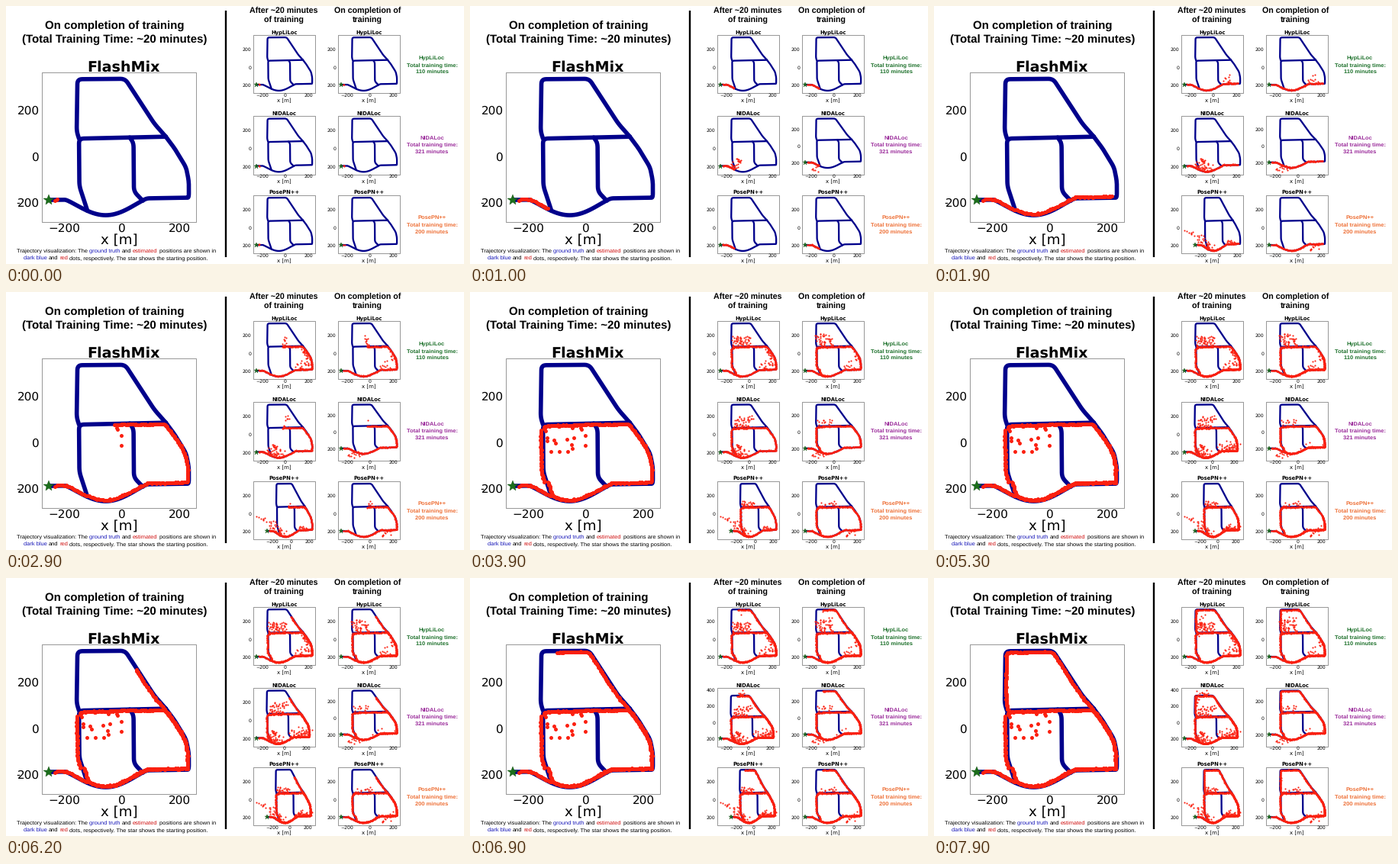
A matplotlib script that plays this animation: 600 px wide and 338 px high, repeating every 8000 ms.

```python
import numpy as np
import matplotlib.pyplot as plt
from matplotlib.animation import FuncAnimation
from matplotlib.patches import Rectangle

W, H, DPI = 600, 338, 100
PT = 72 / DPI  # points per pixel
BLUE, RED, GREEN = "#00008b", "#fb2010", "#1b6e1b"
SANS, DEJAVU = "Liberation Sans", "DejaVu Sans"

plt.rcParams["text.hinting"] = "none"
fig = plt.figure(figsize=(W / DPI, H / DPI), dpi=DPI, facecolor="white")
ax = fig.add_axes([0, 0, 1, 1])
ax.set(xlim=(0, W), ylim=(H, 0))
ax.axis("off")
rng = np.random.default_rng(4)


def bend(points, r=6):
    """Polyline with its corners rounded."""
    p = np.array(points, float)
    out, t = [p[:1]], np.linspace(0, 1, 6)[:, None]
    for a, b, c in zip(p, p[1:], p[2:]):
        u, v = a - b, c - b
        u *= min(.5, r / np.hypot(*u))
        v *= min(.5, r / np.hypot(*v))
        out.append(b + u * (1 - t) ** 2 + v * t ** 2)
    return np.vstack(out + [p[-1:]])


# Road map, y pointing down; one metre is .375 across and .3 down
x = np.linspace(57, 239, 60)
dip = np.sin(np.pi * np.clip((x - 78) / 107, 0, 1))
BOTTOM = np.c_[x, 254 - 3 * (x - 57) / 182 + 21 * dip ** 1.2]
RIGHT = [(239, 251), (239, 230), (235.5, 212), (221, 188), (209, 172)]
CROSS = [(209, 172), (96, 174.5)]
LEFT = [(96, 174.5), (96.5, 236), (107, 268)]
TOP = [(209, 172), (194, 155), (156, 97), (94, 97.5), (93, 165), (96, 174.5)]
MIDDLE = [(162, 173), (167, 180), (167.5, 243), (179, 255)]
ROADS = [bend(r) for r in (np.vstack([BOTTOM, RIGHT[1:]]), CROSS + LEFT[1:],
                           TOP, MIDDLE)]
ROUTE = bend(np.vstack([BOTTOM, RIGHT[1:], CROSS[1:], LEFT[1:],
                        BOTTOM[x > 109], RIGHT[1:], TOP[1:]]))
LENGTH = 930

# Stretches of the route where the estimates go astray
SPOTS = dict(start=(25, 49), curve=(51, 95), merge=(140, 172),
             right=(205, 262), corner=(335, 392), again=(540, 620),
             top=(815, 900))


def travelled(ms):
    return np.interp(ms, [0, 1000, 1900, 3900, 6200, 7900],
                     [12, 49, 184, 500, 768, LENGTH])


def sample(n):
    step = np.hypot(*np.diff(ROUTE, axis=0).T)
    d = np.r_[0, np.cumsum(step)] * LENGTH / step.sum()
    s = np.linspace(0, LENGTH, n)
    return s, np.c_[np.interp(s, d, ROUTE[:, 0]), np.interp(s, d, ROUTE[:, 1])]


def drift(s, p):
    """Shift towards the inside of the loop, outwards after the corner."""
    g = np.gradient(p, axis=0)
    g /= np.hypot(*g.T)[:, None]
    off = 1.5 + .5 * np.sin(s / 9) * np.sin(s / 23)
    off[(s > 392) & (s < 460)] -= 4
    off *= np.clip(s / 60, 0, 1)
    return p + np.c_[g[:, 1], -g[:, 0]] * off[:, None]


DIST, TRACK = sample(760)
TRACK = drift(DIST, TRACK)
LOW = np.vstack(ROADS).min(0)
HIGH = np.vstack(ROADS).max(0)


def text(x, y, s, px, color="black", ha="center", font=SANS, bold=False):
    return ax.text(x, y, s, fontsize=px * PT, color=color, ha=ha,
                   va="baseline", family=font,
                   weight="bold" if bold else "normal")


def caption(x, y, parts, px=7.5):
    """One line of text in several colours, each part right-aligned."""
    line = ""
    for s, color in parts:
        line = (line + " " + s).strip()
        probe = text(x, y, line, px, ha="left")
        width = probe.get_window_extent(fig.canvas.get_renderer()).width
        probe.remove()
        text(x + width, y, s, px, color, "right")


class Plot:
    def __init__(self, box, name, sizes, drops, lines, jitter, gap, shift=0,
                 **astray):
        left, top, w, h = box
        tick, label, title = sizes
        road, dot, star = lines
        self.box, self.tick = box, tick
        ax.add_patch(Rectangle((left, top), w, h, fill=False, ec="#555555",
                               lw=.6 * PT))
        text(left + w / 2 + shift, top - 1.2, name, title, font=DEJAVU,
             bold=True)
        low = top + h
        text(left + w / 2, low + drops[1], "x [m]", label, font=DEJAVU)
        self.xt = [(v, text(0, low + drops[0], s, tick, font=DEJAVU))
                   for v, s in ((77, "\u2212200"), (152, "0"), (227, "200"))]
        self.yt = [(v, text(left - gap, 0, s, tick, ha="right", font=DEJAVU))
                   for v, s in ((78, "400"), (138, "200"), (198, "0"),
                                (258, "200"))]
        self.roads = [ax.plot([], [], color=BLUE, lw=road * PT,
                              solid_capstyle="round",
                              solid_joinstyle="round")[0] for _ in ROADS]
        mark = dict(ls="", marker="o", ms=dot * PT, color=RED, mew=0)
        self.red, = ax.plot([], [], **mark)
        self.far, = ax.plot([], [], **mark)
        self.star, = ax.plot([], [], marker="*", ms=star * PT, color=GREEN,
                             mew=.4 * PT, mec="#0d4a0d")
        self.track = TRACK + rng.normal(0, jitter, TRACK.shape)
        self.scatter(astray)

    def scatter(self, astray):
        """Each spot throws n points up to (dx, dy) off the route."""
        d, p = [np.empty(0)], [np.empty((0, 2))]
        for spot, (n, dx, dy) in astray.items():
            s = np.sort(rng.uniform(*SPOTS[spot], n))
            at = np.c_[np.interp(s, DIST, TRACK[:, 0]),
                       np.interp(s, DIST, TRACK[:, 1])]
            reach = rng.random((n, 1)) ** 1.4
            d.append(s)
            p.append(at + reach * (dx, dy)
                     + rng.normal(0, 3.5, (n, 2)).clip(-6, 6) * (.3 + reach))
        self.fd, self.fp = np.concatenate(d), np.vstack(p)

    def draw(self, ms):
        d = travelled(ms)
        far = self.fp[self.fd <= d]
        # axes grow with the data, 5 % margin all round
        low = np.vstack([far, LOW]).min(0)
        span = np.vstack([far, HIGH]).max(0) - low
        origin, size = np.array(self.box[:2]), np.array(self.box[2:])

        def place(p):
            return origin + size * ((p - low) / span + .05) / 1.1

        for line, road in zip(self.roads, ROADS):
            line.set_data(*place(road).T)
        self.red.set_data(*place(self.track[(DIST <= d) & (DIST > 8)]).T)
        self.far.set_data(*place(far).T)
        self.star.set_data(*place(BOTTOM[:1]).T)
        for v, label in self.xt:
            label.set_x(place((v, 0))[0])
        for v, label in self.yt:
            y = place((0, v))[1]
            label.set_y(y + self.tick * .36 - .5)
            label.set_visible(y > origin[1])


def small(col, row, name, **astray):
    box = ((324, 435)[col], (37.6, 144, 247.6)[row], 80.8, 76.8)
    return Plot(box, name, (6.1, 7, 6.8), (4.4, 11.7), (2.3, 2.1, 7), .7,
                2.4, **astray)


# Left half
text(142.5, 30.5, "On completion of training", 15, bold=True)
text(142.5, 49, "(Total Training Time: ~20 minutes)", 15, bold=True)
INK, LINK, WARM = "black", "#1414b8", "#d01010"
caption(14, 323, [("Trajectory visualization: The", INK),
                  ("ground truth", LINK), ("and", INK), ("estimated", WARM),
                  ("positions are shown in", INK)])
caption(23, 332.4, [("dark blue", LINK), ("and", INK), ("red", WARM),
                    ("dots, respectively. The star shows the starting "
                     "position.", INK)])
ax.plot([15, 17], [258, 258], color="black", lw=1.3 * PT)
ax.plot([288, 288], [6, 329], color="black", lw=2.4 * PT,
        solid_capstyle="butt")

# Right half
for cx, lines in ((364, ("After ~20 minutes", "of training")),
                  (473.5, ("On completion of", "training"))):
    for k, s in enumerate(lines):
        text(cx, 9.7 + 12 * k, s, 10.6, bold=True)
for row, (name, minutes, color) in enumerate((
        ("HypLiLoc", 110, "#1c702a"), ("NIDALoc", 321, "#9a2a9a"),
        ("PosePN++", 200, "#ee6f35"))):
    for k, s in enumerate((name, "Total training time:",
                           f"{minutes} minutes")):
        text(558, 70 + 104.6 * row + 9.2 * k, s, 7.45, color, bold=True)

plots = [
    Plot((47.2, 86.5, 201.5, 196.5), "FlashMix", (15.3, 18.3, 19.2),
         (13, 30), (5.6, 5, 14), .35, 3, 6, corner=(17, 6, 38)),
    small(0, 0, "HypLiLoc", merge=(14, -12, -25), right=(40, -16, 4),
          corner=(70, 5, -38), top=(28, 14, 45)),
    small(1, 0, "HypLiLoc", merge=(12, -10, -25), right=(8, -12, 4),
          corner=(60, -12, -45), top=(20, 12, 40)),
    small(0, 1, "NIDALoc", start=(30, 28, -28), curve=(25, 0, -35),
          corner=(60, 12, -38), again=(45, 8, -28), top=(34, 8, -18)),
    small(1, 1, "NIDALoc", start=(9, -4, 30), curve=(6, -25, 16),
          corner=(18, 6, -25), again=(8, -20, -20)),
    small(0, 2, "PosePN++", curve=(48, -92, -62), merge=(14, -10, -14),
          corner=(34, 5, -20), again=(34, 18, -18)),
    small(1, 2, "PosePN++", merge=(14, -6, 20), corner=(24, 6, -16),
          again=(6, 5, -14)),
]


def update(i):
    for p in plots:
        p.draw(i * 100)
    return []


anim = FuncAnimation(fig, update, frames=80, interval=100, repeat=True,
                     repeat_delay=0, blit=False)
plt.show()
```
